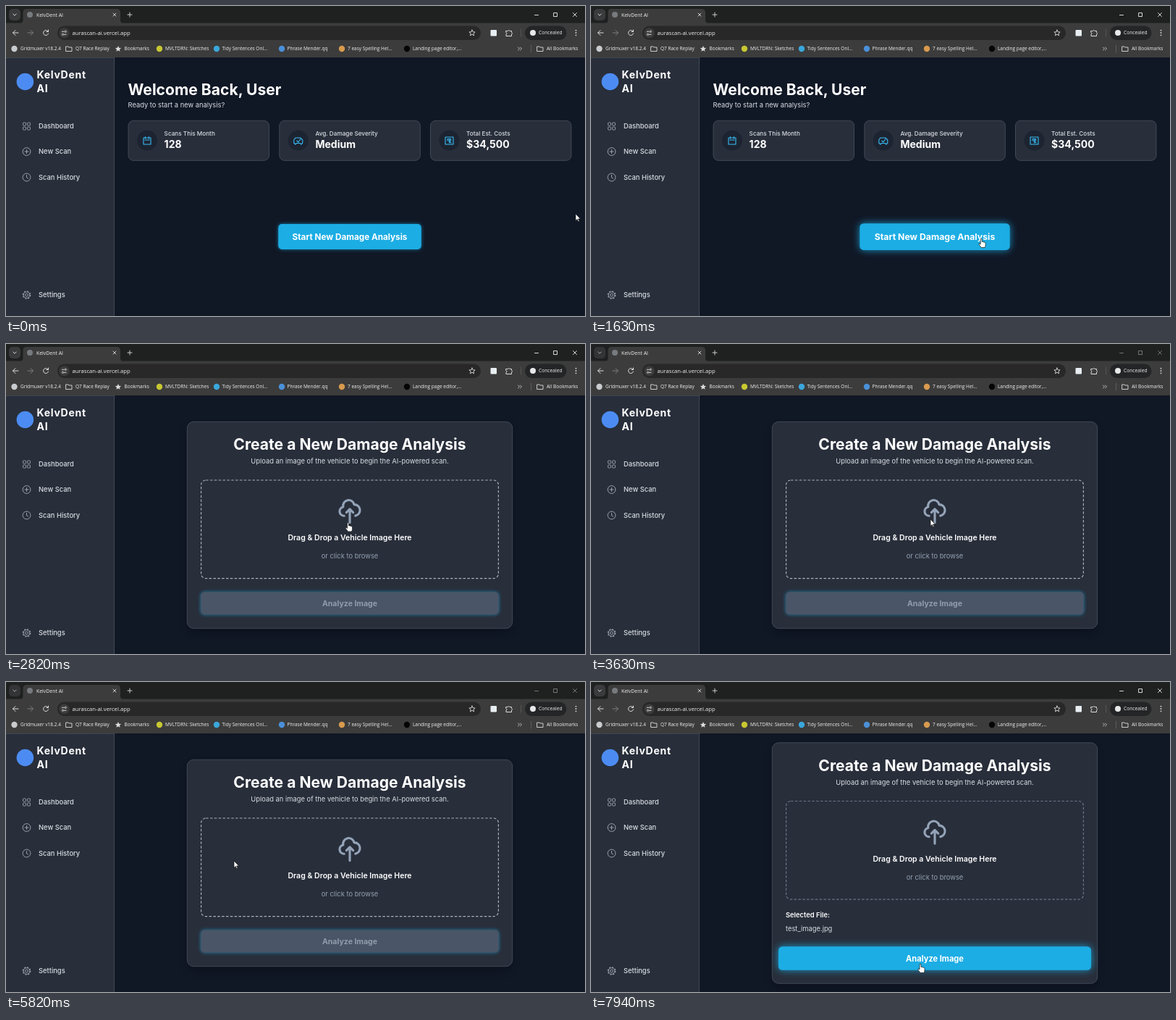
Animation, 800 px wide and 428 px high, one loop 8000 ms. Source, as an HTML page:

```html
<!DOCTYPE html>
<html lang="en">
<head>
<meta charset="utf-8">
<title>Damage analysis demo</title>
<style>
html, body { margin: 0; width: 100%; height: 100%; overflow: hidden; background: #101725; }
svg { display: block; width: 100vw; height: 100vh; }
text { font-family: Inter, sans-serif; fill: #fff; }
.ui text { font-family: "Open Sans", "Noto Sans", sans-serif; fill: #f0f0f0; }
.line { fill: none; stroke-linecap: round; stroke-linejoin: round; }
.mid { text-anchor: middle; }
.soft { fill: #d9dde3; }
.dim { fill: #94a0b1; }
</style>
</head>
<body>
<svg id="stage" viewBox="0 0 800 428" xmlns="http://www.w3.org/2000/svg"></svg>
<script>
const LOOP = 8000;
const stage = document.getElementById('stage');

const rect = (x, y, w, h, r, fill, more = '') =>
  `<rect x="${x}" y="${y}" width="${w}" height="${h}" rx="${r}" fill="${fill}" ${more}/>`;
const dot = (x, y, r, fill) => `<circle cx="${x}" cy="${y}" r="${r}" fill="${fill}"/>`;
const ring = (x, y, r, color, width = 1, more = '') =>
  `<circle cx="${x}" cy="${y}" r="${r}" fill="none" stroke="${color}" stroke-width="${width}" ${more}/>`;
const line = (d, color, width = 1) =>
  `<path class="line" d="${d}" stroke="${color}" stroke-width="${width}"/>`;
const text = (x, y, size, weight, str, cls = '', more = '') =>
  `<text x="${x}" y="${y}" style="font-size:${size}px;font-weight:${weight}" class="${cls}" ${more}>${str}</text>`;
const at = (x, y, body) => `<g transform="translate(${x} ${y})">${body}</g>`;

const CARD = '#282e3a', EDGE = '#4b5361', BLUE = '#1cade4', SKY = '#38bdf8', GREY = '#9ca3af', UI = '#dcdcdc';

const folder = 'M-4-3H-1L0-2H4V3.5H-4Z';
const star = 'M0-4 1.2-1.3 4.1-1 1.9.9 2.6 3.8 0 2.2-2.6 3.8-1.9.9-4.1-1-1.2-1.3Z';

function browser() {
  const marks = [
    [11.5, 20, '#c9cccf', 'Gridmuxer v18.2.4'],
    [0, 96, '', 'Q7 Race Replay'],
    [0, 163.5, '', 'Bookmarks'],
    [212, 220, '#c8c832', 'MVLTDRN: Sketches'],
    [291, 298.5, '#3aa7dc', 'Tidy Sentences Onl...'],
    [381, 388.5, '#4a90d9', 'Phrase Mender.qq'],
    [464, 472, '#d89a4e', '7 easy Spelling Hel...'],
    [554, 562, '#050505', 'Landing page editor,...'],
    [0, 747, '', 'All Bookmarks']
  ];
  return `<g class="ui">
    ${rect(0, 0, 800, 25, 0, '#1f2020')}
    ${rect(0, 23.5, 800, 47.5, 0, '#3c3c3c')}
    <path d="M19 24Q23.500 24 23.500 19V9Q23.500 4 28.500 4H153Q158 4 158 9V19Q158 24 162.500 24Z" fill="#3c3c3c"/>
    <g id="tabMenu">${rect(4, 4, 16, 16, 5, '#3a3b3c')}${line('M9.800 11 12 13.200 14.200 11', UI)}</g>
    ${dot(33, 12, 4, '#777b7f')}
    ${text(42, 14.8, 6.9, 400, 'KelvDent AI')}
    ${line('M148 10 152 14M152 10 148 14M168 12H174M171 9V15', UI, .9)}
    <g id="controls">${line('M730.500 12.500H735.500M757 9.500H761.500V14.500H757ZM783.500 9.500 788.500 14.500M788.500 9.500 783.500 14.500', '#eee', .9)}</g>
    ${line('M17 37H9.500M13 33.500 9.500 37 13 40.500', UI)}
    ${line('M30 37H37.500M34 33.500 37.500 37 34 40.500', '#7d7d7d')}
    ${line('M58 35A3.500 3.500 0 1 0 58.500 38M58.500 33V35.500H56', UI)}
    ${rect(71, 27.5, 585, 19.5, 9.75, '#282828')}
    ${dot(80.5, 37.2, 7, '#3c3c3c')}
    ${line('M77.500 35.300H80M83 39.300H80.500', UI)}${ring(82.3, 35.3, 1.1, UI, .9)}${ring(78.5, 39.3, 1.1, UI, .9)}
    ${text(91.5, 39.9, 7.7, 400, 'aurascan-ai.vercel.app')}
    ${at(644, 37, line(star, UI, .9))}
    ${rect(669.5, 33, 8.5, 8.5, 1, '#e8eef2')}
    ${line('M691 34.500H693.500A1.300 1.300 0 0 1 696 34.500H698.500V36.500A1.300 1.300 0 0 1 698.500 39V41.500H691V39A1.300 1.300 0 0 0 691 36.500Z', UI)}
    ${line('M711.500 32V42', '#5c5c5c', .8)}
    ${rect(717, 27.5, 57.5, 19.5, 9.75, '#242526')}
    ${dot(728, 37, 4, '#e8e8e8')}
    ${text(736, 39.4, 6.7, 400, 'Concealed')}
    ${[33.7, 37, 40.3].map(y => dot(787.5, y, .9, UI)).join('')}
    ${marks.map(([ix, x, color, name]) => (color ? dot(ix, 59, 4.2, color) : '') + text(x, 61.3, 6.5, 400, name)).join('')}
    ${at(87, 59, line(folder, UI, .9))}${at(738, 59, line(folder, UI, .9))}
    ${at(155, 59, `<path d="${star}" fill="${UI}"/>`)}
    ${line('M707.500 57 709.500 59 707.500 61M710.500 57 712.500 59 710.500 61', UI, .8)}
    ${line('M725.500 54V64', '#666', .8)}
  </g>`;
}

function sidebar() {
  const square = (x, y) => rect(x, y, 4, 4, 1, 'none', `stroke="${GREY}" stroke-width=".9"`);
  const round = ring(0, 0, 5.4, GREY);
  const items = [
    [166, 'Dashboard', [-5, 1].map(x => square(x, -5) + square(x, 1)).join('')],
    [201, 'New Scan', round + line('M-2.500 0H2.500M0-2.500V2.500', GREY)],
    [236.5, 'Scan History', round + line('M0-3V.300L2 1.500', GREY)],
    [399, 'Settings', ring(0, 0, 1.9, GREY) + ring(0, 0, 4.3, GREY) +
      ring(0, 0, 5.2, GREY, 1.3, 'stroke-dasharray="2 2.084"')]
  ];
  return rect(0, 71, 150, 357, 0, CARD) + line('M149.600 71V428M0 71.300H150', EDGE, .8) +
    dot(26.4, 104.5, 11.8, '#4c8cf2') +
    [[100.3, 'KelvDent'], [118.8, 'AI']].map(([y, s]) => text(42.5, y, 14.06, 700, s, '', 'letter-spacing=".7"')).join('') +
    items.map(([y, name, icon]) => at(28.5, y, icon) + text(45, y + 3.4, 9.37, 500, name, 'soft')).join('');
}

// Drawn around its own centre so that it can grow on hover.
const button = (id, w, h, size, label) => `<g id="${id}">
  ${rect(-w / 2, -h / 2, w, h, 5, BLUE, 'class="glow"')}${rect(-w / 2, -h / 2, w, h, 5, BLUE, 'class="face"')}
  ${text(0, size * .363, size, 700, label, 'mid')}</g>`;

function home() {
  const stats = [
    [169, 'Scans This Month', '128', 'M-5-4H5V5H-5ZM-2.500-5.500V-3M2.500-5.500V-3M-3-1H3'],
    [377.8, 'Avg. Damage Severity', 'Medium', 'M-4-4H3L6-1V3L4 5 2.500 3.500H-2.500L-4 5-6 3V-1ZM-2 0 0 2 3-2'],
    [586.5, 'Total Est. Costs', '$34,500', 'M-5.500-5H5.500V5H-5.500ZM-2.500 0V-2.500H2V0H-1L2.500 3M0-2.500V3']
  ];
  const cards = stats.map(([x, label, value, icon]) => at(x, 158,
    rect(0, .3, 194.5, 55, 7, CARD, `stroke="${EDGE}" stroke-width=".8"`) +
    dot(26, 27.7, 14, '#1d2431') + at(26, 28, line(icon, SKY, 1.1)) +
    text(49.6, 21.4, 8.2, 500, label, 'soft') + text(49.6, 38.4, 14.06, 700, value))).join('');
  return `<g id="home">${text(168.5, 123.4, 21.1, 700, 'Welcome Back, User')}
    ${text(168.5, 140.4, 9.37, 400, 'Ready to start a new analysis?', 'soft')}${cards}
    ${button('start', 197.5, 35, 11.72, 'Start New Damage Analysis')}</g>`;
}

function upload() {
  const cloud = 'M7 16a4 4 0 0 1-.88-7.903A5 5 0 1 1 15.900 6L16 6a5 5 0 0 1 1 9.900M15 13l-3-3m0 0l-3 3m3-3v12';
  return `<g id="upload">
    ${rect(252, 114, 446, 284, 9, '#050911', 'id="shade" opacity=".4" style="filter:blur(6px)"')}
    ${rect(250.3, 107.3, 449.4, 285.4, 9, CARD, `id="panel" stroke="${EDGE}" stroke-width=".8"`)}
    <g id="form">
      ${text(475, 146, 21.1, 700, 'Create a New Damage Analysis', 'mid')}
      ${text(475, 165.2, 9.37, 400, 'Upload an image of the vehicle to begin the AI-powered scan.', 'mid soft')}
      ${rect(269.6, 188, 410.8, 135.6, 6.5, 'none', 'id="zone" stroke-width="1.17" stroke-dasharray="3.52 2.33"')}
      <g transform="translate(456.300 212.300) scale(1.56)">${line(cloud, '#94a3b8', 2)}</g>
      ${text(475, 271, 10.55, 600, 'Drag &amp; Drop a Vehicle Image Here', 'mid')}
      ${text(475, 296, 9.37, 400, 'or click to browse', 'mid dim')}
    </g>
    <g id="chosen">${text(269, 325, 9.37, 600, 'Selected File:')}${text(269, 344, 9.37, 400, 'test_image.jpg', 'soft')}</g>
    ${button('analyze', 411.5, 31, 10.55, 'Analyze Image')}
  </g>`;
}

stage.innerHTML = rect(0, 0, 800, 428, 0, '#101725') + home() + upload() + sidebar() + browser() + `
  <g id="cursor" stroke="#111" stroke-width=".7" fill="#fff" stroke-linejoin="round">
    <path id="arrow" d="M0 0V9.500L2.200 7.400 3.700 10.800 5.200 10.200 3.700 6.900H6.700Z"/>
    <path id="hand" d="M-1 .800Q0-.600 1 .800V4.500Q2.200 3.800 2.800 4.900Q4 4.300 4.500 5.300Q5.800 5 6 6.400V9Q6 11 4.800 12.500H0Q-1.500 10.500-3.200 8.200Q-3.600 6.800-2.200 7L-1 8Z"/>
  </g>`;

const $ = id => document.getElementById(id);
const show = (id, on) => $(id).style.display = on ? '' : 'none';
const ramp = (t, a, b) => {
  const u = Math.min(1, Math.max(0, (t - a) / (b - a)));
  return u * u * (3 - 2 * u);
};

// Page opens, file dialog takes the focus, focus returns, file is listed.
const OPEN = 1900, BLUR = 3400, FOCUS = 6420, PICKED = 6570;

// Cursor moves: start, end, destination.
const moves = [
  [70, 800, 565, 317], [1200, 1800, 533, 322], [2050, 2950, 469, 242],
  [4000, 5200, 315, 247], [5850, 6350, 502, 347], [6800, 7400, 455, 389]
];

function pointer(t) {
  let x = 787, y = 287;
  for (const [a, b, tx, ty] of moves) {
    const k = ramp(t, a, b);
    x += (tx - x) * k;
    y += (ty - y) * k;
  }
  return [x, y];
}

const inside = (x, y, l, t, r, b) => x >= l && x <= r && y >= t && y <= b;

function setButton(id, y, hover, enabled) {
  const g = $(id), glow = g.querySelector('.glow');
  g.setAttribute('transform', `translate(475 ${y}) scale(${1 + .05 * hover})`);
  glow.style.filter = `blur(${2.9 + 2 * hover}px)`;
  glow.style.opacity = .65 + .2 * hover;
  g.querySelector('.face').style.fill = enabled ? BLUE : '#4a5567';
  g.querySelector('text').style.fill = enabled ? '#fff' : '#929cac';
}

function draw(t) {
  const [x, y] = pointer(t);
  const isHome = t < OPEN, picked = t >= PICKED, focused = t < BLUR || t >= FOCUS;
  const lift = picked ? -23.5 : 0;

  show('home', isHome);
  show('upload', !isHome);
  show('chosen', picked);
  $('form').setAttribute('transform', `translate(0 ${lift})`);
  for (const [id, top, h] of [['panel', 107.3, 285.4], ['shade', 114, 284]]) {
    $(id).setAttribute('y', top + lift);
    $(id).setAttribute('height', h - 2 * lift);
  }
  setButton('start', 318.5, ramp(t, 500, 820), true);
  setButton('analyze', picked ? 381.5 : 358, ramp(t, 7100, 7400), picked);

  // The drop zone keeps its hover look while the dialog is open.
  const lit = ramp(t, OPEN, OPEN + 300) - ramp(t, FOCUS, FOCUS + 300);
  const mix = (a, b) => a + (b - a) * lit;
  $('zone').setAttribute('stroke', `rgb(${mix(107, 168)},${mix(118, 177)},${mix(136, 190)})`);

  const overZone = !isHome && inside(x, y, 269, 188 + lift, 681, 324 + lift);
  const overButton = isHome ? inside(x, y, 376, 301, 574, 336) : picked && inside(x, y, 269, 366, 681, 397);
  const hand = focused && (overButton || overZone);
  show('hand', hand);
  show('arrow', !hand);
  $('cursor').setAttribute('transform', `translate(${x} ${y})`);
  $('controls').style.opacity = focused ? 1 : .45;
  $('tabMenu').style.opacity = focused ? 1 : .75;
}

const begin = performance.now();
function tick() {
  draw((performance.now() - begin) % LOOP);
  requestAnimationFrame(tick);
}
draw(0);
requestAnimationFrame(tick);
</script>
</body>
</html>
```
